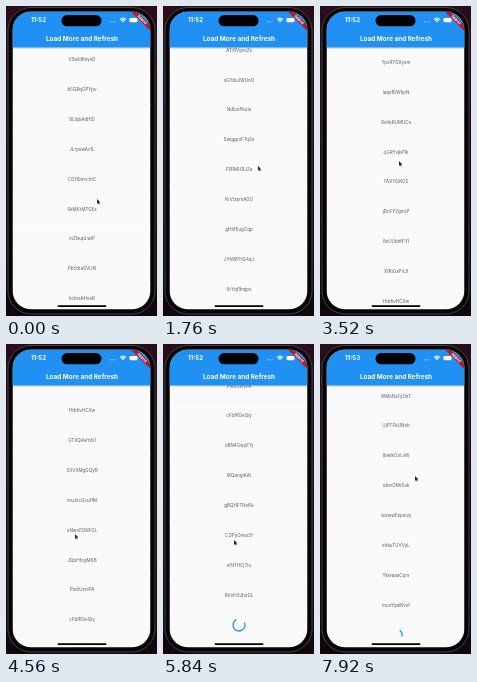
Animation, 151 px wide and 310 px high, one loop 8 s. Source, as an HTML page with a canvas:

```html
<!DOCTYPE html>
<html lang="en">
<head>
<meta charset="utf-8">
<title>Load More and Refresh</title>
<style>
  html, body { margin: 0; width: 100%; height: 100%; overflow: hidden; background: #12060c; }
  canvas { display: block; width: 151px; height: 310px; }
</style>
</head>
<body>
<canvas id="stage"></canvas>
<script>
const LOOP = 8000, STEP = 80, PITCH = 29.85, FIRST_Y = 54, PAGE = 20;
const SCREEN = { x: 6.5, y: 5.5, w: 138, h: 298, r: 19 };
const BAR_BOTTOM = 41.5, BLUE = '#2090f2';

const firstLabels = `VSwIdRsyvD b5QRqOPYpv 8LIqbAdHlD JLrpewAcfL COHbmrchtC SkMXrMTGEx mZIsupLwiP
  PbYdraGVUN kctnsAHseR ATrRVgvsZs sGYduJWUnO NdIuxPkuIs SwqgpoFTqSx FERMURJZa KrVizpmAOO
  gHhfEugCqp JYhWPHG4qJ XrYqf9mjpv YpxRYGXyem iaqsfDWkpN XehkRUMUCs oGRYvjkPRi TAXY6iKOS
  jDcFY2gmrP 8sUUbhfFYI XfRiGxPVJI HtbfivHCXw GTXQiAeYdU SXVXMgGQyR muJscGcuHM oNwoEONFGL
  JQpHfogMXB PtehUsnlPA cFbfRGeQiy oBN4GwyEYj lKQangIAAl gBQHFTNvKk COPyOnexSf viNTHCjTIu
  RXnHXJhzGL`.split(/\s+/);
const lastLabels = `WMeBxFyOnT UjPTFkUNnh tbwlkOoLsW obsrOMrSsk wzwwEzpsuq ehkuTUVVyL
  YkwaaaCqrs muoYqaWvxf`.split(/\s+/);

function randomLabel(seed) {
  return Array.from({ length: 10 }, () => {
    seed = (seed * 16807 + 11) % 2147483647;
    const letter = String.fromCharCode(97 + seed % 26);
    return seed % 7 < 3 ? letter.toUpperCase() : letter;
  }).join('');
}
const fillers = Array.from({ length: 3 * PAGE - firstLabels.length - lastLabels.length },
  (_, i) => randomLabel(7919 * (i + 1)));
const labels = [...firstLabels, ...fillers, ...lastLabels];

// Each flick starts at a time and coasts over a distance
const FLICK_TIME = 900;
const flicks = [[500, 115], [1500, 255], [3080, 190], [3960, 211], [4860, 196],
  [6680, 232], [7040, 232], [7400, 133]];

// Pointer way points: time, x, y
const route = [[0, 91, 193], [1120, 102, 126], [2560, 85, 207], [3520, 79, 155],
  [4560, 69, 190], [5840, 71, 196], [7920, 95, 132]];

const clamp = x => Math.min(1, Math.max(0, x));
const smooth = x => x * x * (3 - 2 * x);
const easeOut = x => 1 - (1 - clamp(x)) ** 3;

const scrollAt = t => flicks.reduce((sum, [start, distance]) =>
  sum + distance * easeOut((t - start) / FLICK_TIME), 0);

function pointerAt(t) {
  const next = Math.max(1, route.findIndex(p => p[0] > t));
  const i = t >= route.at(-1)[0] ? route.length - 1 : next;
  const [t0, x0, y0] = route[i - 1], [t1, x1, y1] = route[i];
  const k = smooth(clamp((t - t0) / (t1 - t0)));
  return [x0 + (x1 - x0) * k, y0 + (y1 - y0) * k];
}

// cubic-bezier(.4, 0, .2, 1)
function standardEase(x) {
  x = clamp(x);
  let lo = 0, hi = 1;
  for (let i = 0; i < 18; i++) {
    const s = (lo + hi) / 2;
    if (1.2 * s * (1 - s) ** 2 + .6 * s * s * (1 - s) + s ** 3 < x) lo = s; else hi = s;
  }
  return smooth(lo);
}

const canvas = document.getElementById('stage');
const c = canvas.getContext('2d');
const dpr = window.devicePixelRatio || 1;
canvas.width = Math.round(151 * dpr);
canvas.height = Math.round(310 * dpr);

function rounded(x, y, w, h, r, fill, stroke) {
  c.beginPath();
  c.roundRect(x, y, w, h, r);
  c.fillStyle = fill;
  c.fill();
  if (stroke) { c.strokeStyle = stroke; c.lineWidth = .9; c.stroke(); }
}

function text(str, x, y, size, weight, color) {
  c.font = `${weight} ${size}px Inter, Roboto, sans-serif`;
  c.textAlign = 'center';
  c.textBaseline = 'middle';
  c.fillStyle = color;
  c.fillText(str, x, y);
}

function arc(x, y, r, from, to, color, width) {
  c.beginPath();
  c.arc(x, y, r, from, to);
  c.strokeStyle = color;
  c.lineWidth = width;
  c.stroke();
}

function spinner(y, elapsed) {
  const e = Math.max(0, elapsed), p = e / 1333 % 1;
  const head = standardEase(p * 2) * 1.5 * Math.PI;
  const tail = standardEase(p * 2 - 1) * 1.5 * Math.PI;
  const start = -Math.PI / 2 + tail + e / 2222 * 2 * Math.PI + p * Math.PI / 2;
  arc(76, y, 6, start, start + Math.max(head - tail, .02), BLUE, 1.3);
}

function list(t) {
  const page = t < 3000 ? 1 : t < 6680 ? 2 : 3;
  const count = page * PAGE, scroll = scrollAt(t);
  const spinnerStart = [-706, 1241, 7750][page - 1];
  for (let i = 0; i <= count; i++) {
    const y = FIRST_Y + i * PITCH - scroll;
    if (y < 20 || y > 325) continue;
    if (i === count) {
      spinner(y, t - spinnerStart);
    } else {
      text(labels[i], 76, y, 4.5, 400, '#5c5c5c');
      c.fillStyle = '#f0f0f0';
      c.fillRect(SCREEN.x, y + PITCH / 2 - .25, SCREEN.w, .5);
    }
  }
}

function appBar(t) {
  const shadow = c.createLinearGradient(0, BAR_BOTTOM, 0, BAR_BOTTOM + 2);
  shadow.addColorStop(0, 'rgba(0,0,0,.2)');
  shadow.addColorStop(1, 'rgba(0,0,0,0)');
  c.fillStyle = shadow;
  c.fillRect(SCREEN.x, BAR_BOTTOM, SCREEN.w, 2);
  c.fillStyle = BLUE;
  c.fillRect(SCREEN.x, SCREEN.y, SCREEN.w, BAR_BOTTOM - SCREEN.y);
  text('Load More and Refresh', 76, 32.8, 6.4, 700, '#fff');
  text(t < 6400 ? '11:52' : '11:53', 32.5, 14.2, 6.2, 700, '#fff');
  rounded(55.5, 9, 40, 11.3, 5.6, '#000');

  // Signal, wifi and battery
  c.fillStyle = 'rgba(255,255,255,.55)';
  for (let i = 0; i < 4; i++) c.fillRect(104 + i * 1.6, 15.3, 1, 1);
  for (const r of [1.2, 3, 4.6]) arc(117, 16.8, r, -2.3, -.84, '#fff', 1.1);
  rounded(123.5, 12, 8, 4.2, 1.3, '#fff');

  c.save();
  c.translate(SCREEN.x + SCREEN.w, SCREEN.y);
  c.rotate(Math.PI / 4);
  c.fillStyle = '#a91f35';
  c.fillRect(-14, 9.8, 28, 4.2);
  text('DEBUG', 0, 12, 3.4, 800, '#fff');
  c.restore();
}

const arrow = new Path2D('M0 0V6.2L1.4 4.9 2.4 7 3.4 6.5 2.5 4.5H4.4Z');

function pointer([x, y]) {
  c.save();
  c.translate(x, y);
  c.scale(.8, .8);
  c.lineJoin = 'round';
  c.strokeStyle = '#fff';
  c.lineWidth = 1;
  c.stroke(arrow);
  c.fillStyle = '#2a2a2a';
  c.fill(arrow);
  c.restore();
}

function draw(t) {
  c.setTransform(dpr, 0, 0, dpr, 0, 0);
  const backdrop = c.createLinearGradient(0, 0, 0, 310);
  backdrop.addColorStop(0, '#2a0d1b');
  backdrop.addColorStop(1, '#10060b');
  c.fillStyle = backdrop;
  c.fillRect(0, 0, 151, 310);
  rounded(2, 1.5, 147, 306.5, 23, '#050505', '#4a494e');

  c.save();
  c.beginPath();
  c.roundRect(SCREEN.x, SCREEN.y, SCREEN.w, SCREEN.h, SCREEN.r);
  c.clip();
  c.fillStyle = '#fafafa';
  c.fillRect(SCREEN.x, SCREEN.y, SCREEN.w, SCREEN.h);
  list(t);
  appBar(t);
  rounded(51.5, 299.3, 49, 1.6, .8, '#000');
  c.restore();

  pointer(pointerAt(t));
}

const began = performance.now();
function frame() {
  const t = (performance.now() - began) % LOOP;
  draw(Math.floor(t / STEP) * STEP);
  requestAnimationFrame(frame);
}
frame();
</script>
</body>
</html>
```
